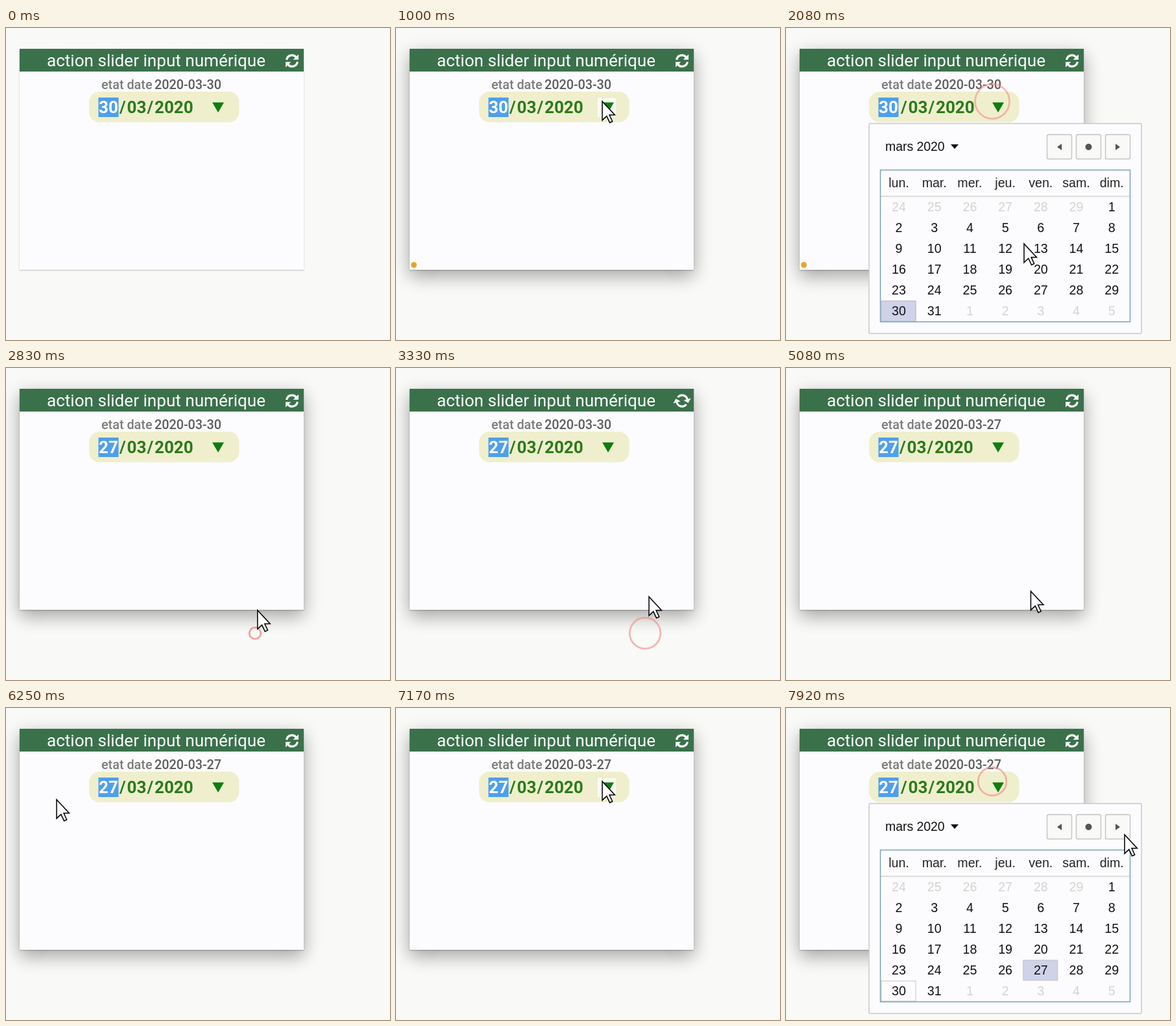
Animation of 592x480 px, one loop 8 s. Source, as an HTML page:

```html
<!DOCTYPE html>
<html lang="fr">
<head>
<meta charset="utf-8">
<title>Date input</title>
<style>
  html, body { margin: 0; width: 592px; height: 480px; overflow: hidden; background: #f9f9f8; }
  #card { position: absolute; left: 21px; top: 32px; width: 438px; height: 340px; background: #fcfcfe; }
  svg { position: absolute; left: 0; top: 0; }
  .roboto { font-family: Roboto, sans-serif; }
  #calendar { font: 19.6px "Liberation Sans", Arial, sans-serif; }
  .mid { text-anchor: middle; }
</style>
</head>
<body>
<div id="card"></div>
<svg width="592" height="480" viewBox="0 0 592 480">
  <g class="roboto">
    <rect x="21" y="32" width="438" height="35" fill="#3a714b"/>
    <text class="mid" x="231.5" y="59" font-size="26.1" fill="#fcfcfe">action slider input numérique</text>
    <g id="refresh" fill="none" stroke="#fcfcfe" stroke-width="3.2">
      <g id="half">
        <path d="M-8.3-1.5A8.2 8.2 0 0 1 6.5-5.2"/>
        <path d="M10-10V-1.7H1.7Z" fill="#fcfcfe" stroke="none"/>
      </g>
      <use href="#half" transform="rotate(180)"/>
    </g>
    <g font-size="19.8" font-weight="500">
      <text x="147" y="94" fill="#7b7b78">etat date</text>
      <text id="state" x="229" y="94" fill="#5c5c5a"></text>
    </g>
    <rect x="128" y="98" width="231.5" height="47" rx="16" fill="#efefcd"/>
    <rect id="arrowHover" x="311" y="108" width="28" height="29" fill="#fbfbf6"/>
    <rect x="142.5" y="107" width="31" height="30" fill="#4f9feb"/>
    <g font-size="26" font-weight="700">
      <text id="day" x="143" y="131" fill="#fcfcfe"></text>
      <g id="rest" fill="#2a7a1c">
        <text x="175" y="131">/</text>
        <text x="186.5" y="131">03</text>
        <text x="217.5" y="131">/</text>
        <text x="229" y="131">2020</text>
      </g>
    </g>
    <path d="M318 114.5H336L327 130Z" fill="#0f7d0f"/>
  </g>
  <circle id="dot" cx="27.5" cy="364.5" r="4.5" fill="#e8a52f"/>
  <g id="calendar">
    <rect x="128" y="147" width="420" height="323" rx="2" fill="#fcfcfe" stroke="#c9c9c9" stroke-width="1.5"/>
    <text x="153" y="189" font-size="19.4" fill="#111">mars 2020</text>
    <path d="M254 179H266L260 186Z" fill="#111"/>
    <g id="buttons" fill="#f9f9f8" stroke="#c4c4c0" stroke-width="1.4"></g>
    <path d="M425 178V188L418 183ZM508 178V188L515 183Z" fill="#555"/>
    <circle cx="466.5" cy="183" r="5" fill="#555"/>
    <rect id="today" width="53" height="31" fill="none" stroke="#c6c6c2"/>
    <rect id="chosen" width="53" height="31" fill="#d0d2ea" stroke="#bfbfc4"/>
    <path d="M146 259H530" stroke="#d4d4d0" stroke-width="1.3"/>
    <g id="cells" class="mid"></g>
    <rect x="145.5" y="218.5" width="385" height="233.5" fill="none" stroke="#7ba3b4" stroke-width="1.5"/>
  </g>
  <circle id="ring" fill="none" stroke="#f08a80" stroke-width="2.8"/>
  <path id="cursor" d="M0 0V17L4 13.3L6.8 19.2L9.2 18.1L6.5 12.2H11.4Z" fill="#fff" stroke="#000" stroke-width=".9"/>
</svg>
<script>
const LOOP = 8000, OPEN = 1330, PICK = 2670, REFRESHED = 5000, REOPEN = 7330;
const $ = id => document.getElementById(id);
const attrs = (id, values) => { for (const k in values) $(id).setAttribute(k, values[k]); };
const show = (id, on) => attrs(id, { visibility: on ? 'visible' : 'hidden' });
const mix = (a, b, u) => a + (b - a) * u;
const ease = (t, from, to) => {
  const u = Math.min(1, Math.max(0, (t - from) / (to - from)));
  return u * u * (3 - 2 * u);
};

// Static calendar content
const columnX = c => 174 + c * 54.7, rowY = r => 275 + r * 32;
const cellAt = (c, r) => ({ x: columnX(c) - 27, y: rowY(r) - 15 });
const label = (text, x, y, color) => `<text x="${x}" y="${y}" fill="${color}">${text}</text>`;
let cells = ['lun.', 'mar.', 'mer.', 'jeu.', 'ven.', 'sam.', 'dim.']
  .map((name, c) => label(name, columnX(c), 245, '#222')).join('');
for (let i = 0; i < 42; i++) {
  const date = new Date(2020, 1, 24 + i);
  cells += label(date.getDate(), columnX(i % 7), rowY(Math.floor(i / 7)) + 7,
    date.getMonth() === 2 ? '#111' : '#d3d3d0');
}
$('cells').innerHTML = cells;
for (let i = 0; i < 3; i++)
  $('buttons').innerHTML += `<rect x="${402.5 + 45 * i}" y="164" width="38" height="37.5" rx="2.5"/>`;
attrs('today', cellAt(0, 5));

const offstage = { x: 600, y: 80 }, arrow = { x: 318, y: 113 }, day27 = { x: 384, y: 408 };
const moves = [
  { from: 80, to: 1000, spot: arrow },
  { from: 1400, to: 2420, spot: day27 },
  { from: 2690, to: 2930, spot: { x: 390, y: 352 } },
  { from: REFRESHED, to: 5670, spot: { x: 78, y: 141 } },
  { from: 6250, to: 7170, spot: arrow },
  { from: 7400, to: 7920, spot: { x: 522, y: 195 } }
];
const clicks = [
  { at: OPEN, spot: arrow }, { at: PICK, spot: day27 }, { at: REOPEN, spot: arrow }
];

function cursorAt(t) {
  let { x, y } = offstage;
  for (const { from, to, spot } of moves) {
    const u = ease(t, from, to);
    x = mix(x, spot.x, u);
    y = mix(y, spot.y, u);
  }
  return { x, y };
}

function draw(t) {
  const open = (t >= OPEN && t < PICK) || t >= REOPEN;
  const picked = t >= PICK;

  const lift = ease(t, 330, 630);
  $('card').style.boxShadow = `0 1px 2px rgba(0,0,0,.25),
    0 11px 24px rgba(0,0,0,${.2 * lift}), 0 8px 28px rgba(0,0,0,${.17 * lift})`;

  $('state').textContent = t < REFRESHED ? '2020-03-30' : '2020-03-27';
  $('day').textContent = picked ? '27' : '30';
  attrs('rest', { transform: `translate(${open ? 2 : 0})` });
  const spin = t >= 3170 && t < 4750 ? (t - 3170) * .18 : 0;
  attrs('refresh', { transform: `translate(441 50.5) rotate(${spin})` });
  show('dot', t >= 750 && t < PICK);

  const { x, y } = cursorAt(t);
  attrs('cursor', { transform: `translate(${x} ${y}) scale(1.7)` });
  show('arrowHover', !open && Math.hypot(x - arrow.x, y - arrow.y) < 16);

  show('calendar', open);
  attrs('chosen', picked ? cellAt(4, 4) : cellAt(0, 5));

  const click = clicks.find(({ at }) => t >= at && t < at + 1090);
  show('ring', click);
  if (click) {
    const age = t - click.at;
    attrs('ring', { cx: click.spot.x, cy: click.spot.y, r: 4 + age * .03, opacity: .85 - age / 2600 });
  }
}

function frame(now) {
  draw(now % LOOP);
  requestAnimationFrame(frame);
}
draw(0);
requestAnimationFrame(frame);
</script>
</body>
</html>
```
